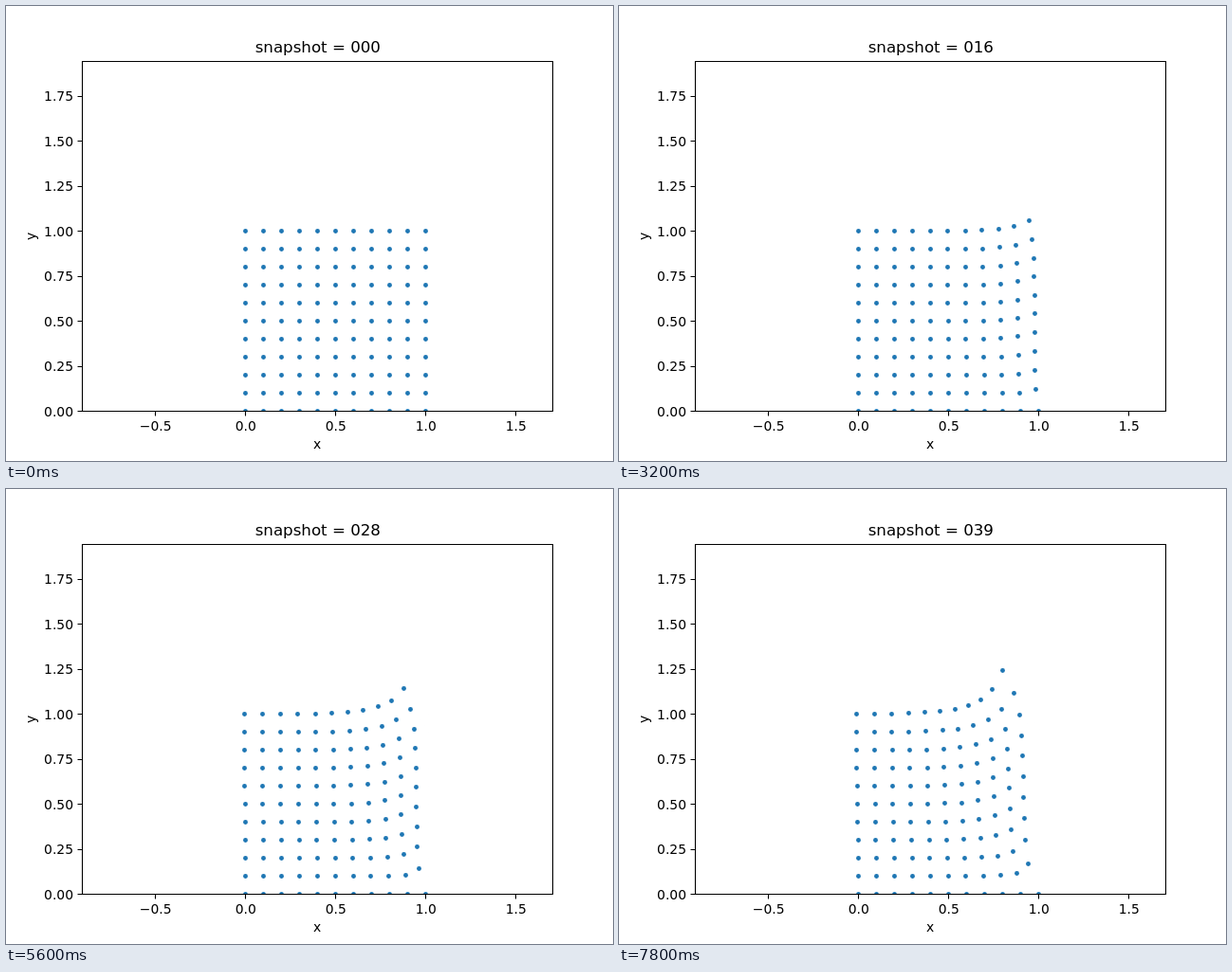
An HTML page that plays this animation: 640x480 px, repeating every 8000 ms.

```html
<!DOCTYPE html>
<html lang="en">
<head>
<meta charset="utf-8">
<title>Deforming grid</title>
<style>
  html, body { margin: 0; width: 100%; height: 100%; overflow: hidden; background: #fff; }
  svg { display: block; width: 640px; height: 480px; }
  text { font: 13.889px "DejaVu Sans", sans-serif; fill: #000; text-anchor: middle; }
  #title { font-size: 16.667px; }
  .end { text-anchor: end; }
  #dots { fill: #1f77b4; }
  #axes { fill: none; stroke: #000; stroke-width: 1.11; }
</style>
</head>
<body>
<svg viewBox="0 0 640 480">
  <clipPath id="plot"><rect x="80" y="58" width="496" height="369.5"/></clipPath>
  <g id="dots" clip-path="url(#plot)"></g>
  <path id="axes"/>
  <g id="labels">
    <text id="title" x="328.8" y="49"></text>
    <text x="328" y="467">x</text>
    <text transform="translate(31 243) rotate(-90)">y</text>
  </g>
</svg>
<script>
const SCALE = 190, ORIGIN_X = 252, ORIGIN_Y = 427.2;
const STEP_MS = 200, STEPS = 40, LAST = STEPS - 1, CELLS = 10;

const svgNode = (name, parent, attrs) => {
  const node = document.createElementNS("http://www.w3.org/2000/svg", name);
  for (const key in attrs) node.setAttribute(key, attrs[key]);
  return parent.appendChild(node);
};
const byId = id => document.getElementById(id);
const pixel = v => Math.round(v) + .5;

function drawAxes() {
  const labels = byId("labels");
  let path = "M80.5 58.5H576.5V427.5H80.5Z";
  for (let v = -.5; v <= 1.5; v += .5) {
    const x = ORIGIN_X + v * SCALE;
    path += `M${pixel(x)} 427.5v5`;
    svgNode("text", labels, { x: x + .7, y: 448 }).textContent = v.toFixed(1).replace("-", "\u2212");
  }
  for (let v = 0; v <= 1.75; v += .25) {
    const y = ORIGIN_Y - v * SCALE;
    path += `M80.5 ${pixel(y)}h-5`;
    svgNode("text", labels, { x: 71, y: Math.round(y + 5.5), class: "end" }).textContent = v.toFixed(2);
  }
  byId("axes").setAttribute("d", path);
}

// The bottom row is pinned. From the right edge a front decays across each row
// and reflects weakly off the free left edge; its reach grows with time.
function displace(row, col, time) {
  if (!row || !time) return { left: 0, up: 0 };
  const base = Math.exp(-.75 * (row - 1));
  const tip = Math.exp(-.8 * (CELLS - row));
  const growth = time ** (1.4 + .015 * row);
  const reach = time ** .45;
  const front = (decay, power) => {
    const wave = u => Math.exp(-decay * (u / reach) ** power);
    return growth * (wave(CELLS - col) + wave(CELLS + col) / 2);
  };
  return {
    left: (15.9 - 4.7 * base + 22.3 * tip)
      * front(.26 + .72 * base - .035 * tip, 1.02 - .27 * base + .16 * tip),
    up: (18 + 2.3 * row - 7.2 * base + 5.3 * tip)
      * front(.515 + .885 * base + .035 * tip, 1.19 - .24 * base - .19 * tip)
  };
}

const dots = [];
for (let row = 0; row <= CELLS; row++)
  for (let col = 0; col <= CELLS; col++)
    dots.push({ row, col, node: svgNode("circle", byId("dots"), { r: 2.43 }) });

function draw(step) {
  const gap = SCALE / CELLS;
  byId("title").textContent = "snapshot = " + String(step).padStart(3, "0");
  for (const { row, col, node } of dots) {
    const { left, up } = displace(row, col, step / LAST);
    node.setAttribute("cx", pixel(ORIGIN_X + col * gap - left));
    node.setAttribute("cy", pixel(ORIGIN_Y - row * gap - up));
  }
}

let shown = -1;
const start = performance.now();
function tick() {
  const step = Math.floor((performance.now() - start) / STEP_MS) % STEPS;
  if (step !== shown) draw(shown = step);
  requestAnimationFrame(tick);
}
drawAxes();
tick();
</script>
</body>
</html>
```
